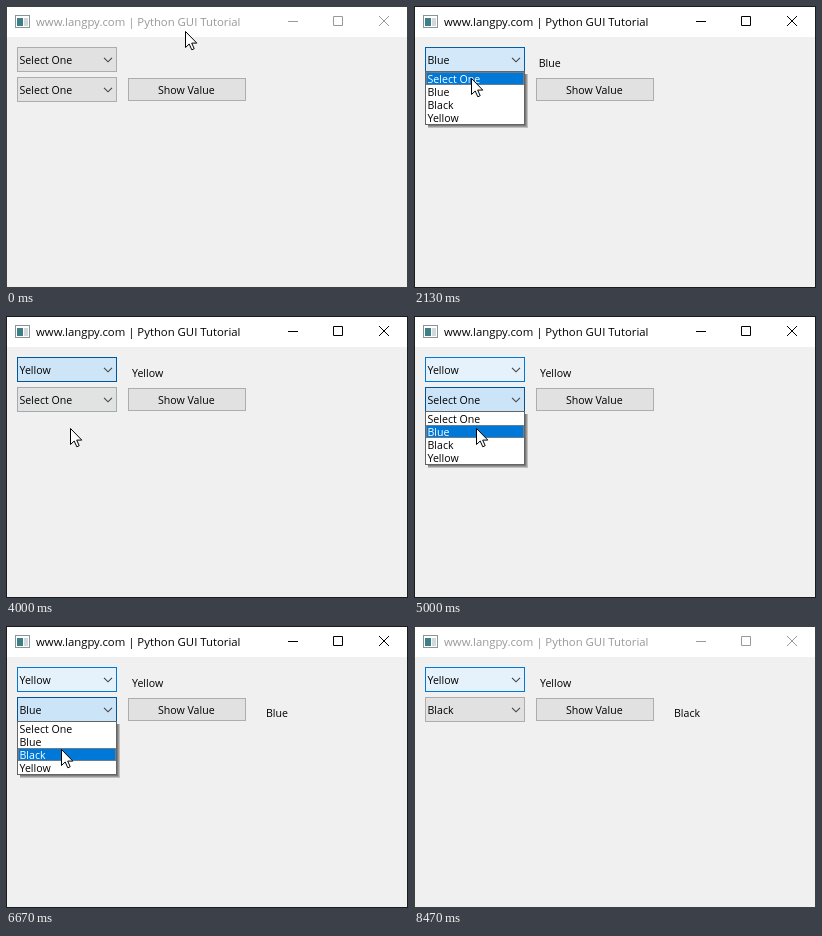
Write an HTML page that moves like this. It is 402 px wide and 282 px high and loops after 8590 ms.

```html
<!DOCTYPE html>
<html lang="en">
<head>
<meta charset="utf-8">
<title>Combo boxes</title>
<style>
  html, body { margin: 0; width: 100%; height: 100%; overflow: hidden; background: #f0f0f0; }
  svg { display: block; }
  text { font: 10.6px "Open Sans", "Noto Sans", sans-serif; white-space: pre; }
  #title { font-size: 11.35px; }
</style>
</head>
<body>
<svg id="stage" width="402" height="282" viewBox="0 0 402 282"></svg>
<script>
const LOOP = 8590, STEP = 200 / 3;
const ITEMS = ["Select One", "Blue", "Black", "Yellow"];

const LOOKS = {
  normal: { fill: [225, 225, 225], stroke: [173, 173, 173], fade: 320 },
  hover: { fill: [229, 241, 251], stroke: [0, 120, 215], fade: 200 },
  press: { fill: [204, 228, 247], stroke: [0, 84, 153], fade: 200 }
};

// When each widget starts to fade to a look
const FADES = {
  combo1: [[600, "hover"], [730, "press"], [1400, "normal"], [1660, "hover"], [1990, "press"],
    [2790, "normal"], [2940, "hover"], [3390, "press"], [3990, "hover"]],
  combo2: [[1400, "hover"], [1660, "normal"], [2600, "hover"], [2940, "normal"], [3990, "hover"],
    [4320, "press"], [5050, "hover"], [5190, "normal"], [5920, "hover"], [6190, "press"], [7120, "normal"]],
  button: [[5250, "hover"], [5450, "press"], [5590, "hover"], [5720, "normal"],
    [7190, "hover"], [7520, "press"], [7590, "hover"], [7720, "normal"]]
};

// When each widget takes its next item
const PICKS = { combo1: [1390, 2790, 3990], combo2: [5050, 6990], label2: [5590, 7590] };

// When each list opens; it closes at the matching pick
const OPENS = { combo1: [790, 2050, 3450], combo2: [4380, 6250] };

// Pointer path: time, x, y
const PATH = [
  [0, 179, 25], [600, 72, 55], [800, 58, 58], [1200, 57, 87], [1400, 57, 87], [1800, 57, 57],
  [2000, 56, 57], [2133, 57, 72], [2533, 66, 99], [2800, 66, 99], [3133, 67, 57], [3400, 64, 57],
  [3900, 64, 112], [4000, 64, 112], [4200, 62, 84], [4400, 62, 84], [4930, 62, 112], [5066, 62, 112],
  [5333, 146, 88], [5600, 146, 88], [5866, 74, 124], [6000, 36, 95], [6266, 46, 84], [6730, 56, 129],
  [7000, 57, 129], [7200, 124, 91], [7400, 176, 78], [7666, 178, 83], [7933, 137, 182], [8200, 57, 284]
];

const stage = document.getElementById("stage");

function set(el, attrs) {
  for (const key in attrs) el.setAttribute(key, attrs[key]);
}
function add(tag, attrs, parent = stage, text = "") {
  const el = document.createElementNS("http://www.w3.org/2000/svg", tag);
  set(el, attrs);
  el.textContent = text;
  parent.append(el);
  return el;
}
const box = (x, y, width, height, fill) => add("rect", { x, y, width, height, fill });
const frame = (x, y, w, h, stroke, fill = "none", parent) =>
  add("rect", { x: x + .5, y: y + .5, width: w - 1, height: h - 1, stroke, fill }, parent);
const label = (x, y, text, parent) => add("text", { x, y }, parent, text);

box(0, 0, 402, 282, "#f0f0f0");
box(0, 0, 402, 31, "#fff");
const edge = frame(0, 0, 402, 282, "#222");

// Window icon
frame(9, 9, 15, 13, "#8a9499", "#fff");
box(11, 12, 6, 8, "#3d7f86");
box(18, 12, 4, 8, "#d3d8da");

const title = label(30, 20, "www.langpy.com | Python GUI Tutorial");
title.id = "title";
const controls = add("path", { d: "M282 15.5h10M327.5 10.5h9v9h-9zM373 10l10 10m0-10l-10 10", fill: "none" });

function makeCombo(y) {
  const body = frame(11, y, 100, 25);
  const text = label(13.5, y + 17, "");
  add("path", { d: `M98 ${y + 10.8}l4 4l4-4`, fill: "none", stroke: "#444", "stroke-width": 1.1 });
  return { body, text };
}

function makePopup(y) {
  const g = add("g", {});
  for (let i = 1; i < 4; i++)
    add("rect", { x: 14, y: y + 3, width: 97 + i, height: 51 + i, opacity: .2 }, g);
  frame(11, y, 100, 54, "#646464", "#fff", g);
  const bar = add("g", {}, g);
  add("rect", { x: 12, width: 98, height: 13, fill: "#0078d7" }, bar);
  set(frame(12, 0, 98, 13, "#ff8728", "none", bar), { "stroke-dasharray": "1 1", "stroke-opacity": .8 });
  const rows = ITEMS.map((item, i) => label(13.5, y + 12 + 13 * i, item, g));
  return { g, bar, rows, top: y + 1 };
}

const combos = { combo1: makeCombo(41), combo2: makeCombo(71) };
const button = frame(122, 72, 118, 23);
set(label(180.3, 88, "Show Value"), { "text-anchor": "middle" });
const label1 = label(125, 61, "");
const label2 = label(260, 91, "");
const popups = { combo1: makePopup(65), combo2: makePopup(95) };
const pointer = add("path", { d: "M.5 .5v16l3.7-3.5l2.6 5.8l2.4-1.1l-2.5-5.6h5.1z", fill: "#fff", stroke: "#000" });

const mix = (a, b, k) => a + (b - a) * k;
const mixColor = (a, b, k) => a.map((c, i) => mix(c, b[i], k));
const picked = (name, t) => PICKS[name].filter(at => at <= t).length;

function paint(el, fades, t) {
  let { fill, stroke } = LOOKS.normal;
  for (const [start, name] of fades) {
    if (t < start) break;
    const look = LOOKS[name], k = Math.min(1, (t - start) / look.fade);
    fill = mixColor(fill, look.fill, k);
    stroke = mixColor(stroke, look.stroke, k);
  }
  set(el, { fill: `rgb(${fill.map(Math.round)})`, stroke: `rgb(${stroke.map(Math.round)})` });
}

function pointerAt(t) {
  const i = PATH.findIndex(p => p[0] > t);
  if (i < 0) return [57, 300];
  const [t0, ...from] = PATH[i - 1], [t1, ...to] = PATH[i];
  return mixColor(from, to, (t - t0) / (t1 - t0)).map(Math.round);
}

function showPopup(popup, open, y, value) {
  set(popup.g, { visibility: open ? "visible" : "hidden" });
  const over = Math.floor((y - popup.top) / 13);
  const row = over >= 0 && over < 4 ? over : value;
  set(popup.bar, { transform: `translate(0 ${popup.top + 13 * row})` });
  popup.rows.forEach((el, i) => set(el, { fill: i === row ? "#fff" : "#000" }));
}

function render(time) {
  const t = Math.floor((time % LOOP + 5) / STEP) * STEP;
  const active = t > 60 && t < 8460;
  const ink = active ? "#000" : "#999";
  set(edge, { stroke: active ? "#1c1c1c" : "#404040" });
  set(title, { fill: ink });
  set(controls, { stroke: ink });

  const [x, y] = pointerAt(t);
  set(pointer, { transform: `translate(${x} ${y})` });

  for (const name in combos) {
    const value = picked(name, t);
    const open = OPENS[name].some((at, i) => t >= at && t < PICKS[name][i]);
    paint(combos[name].body, FADES[name], t);
    combos[name].text.textContent = ITEMS[value];
    showPopup(popups[name], open, y, value);
  }
  paint(button, FADES.button, t);

  const first = picked("combo1", t), second = picked("label2", t);
  label1.textContent = first ? ITEMS[first] : "";
  set(label1, { x: first === 3 ? 126 : 124.7 });
  label2.textContent = second ? ITEMS[second] : "";
}

const begin = performance.now();
function tick() {
  render(performance.now() - begin);
  requestAnimationFrame(tick);
}
tick();
</script>
</body>
</html>
```
